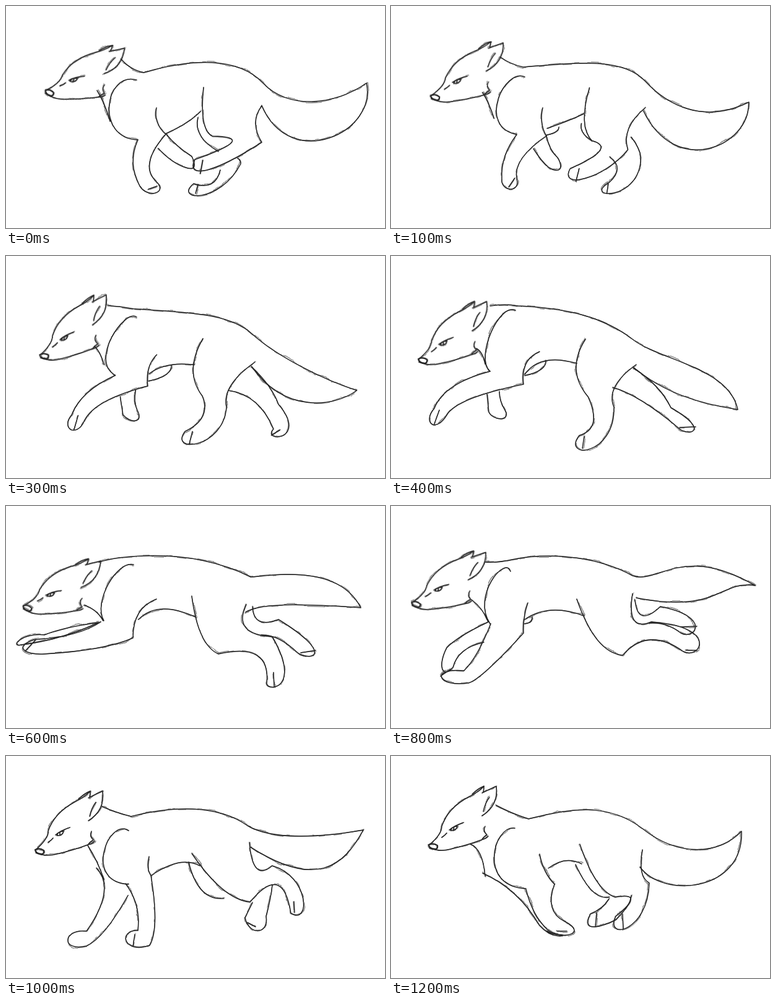
Write an HTML page without scripts that moves like this. It is 612 px wide and 360 px high and loops after 1300 ms.

```html
<!DOCTYPE html>
<html lang="en">
<head>
<meta charset="utf-8">
<title>Running fox sketch</title>
<style>
html, body { margin: 0; width: 100%; height: 100%; overflow: hidden; background: #fff; }
svg { display: block; width: 612px; height: 360px; }
path { fill: none; stroke: #222; stroke-width: 1.5; stroke-linecap: round; stroke-linejoin: round; }
.bold { stroke-width: 2; }

/* seven key poses; each holds for one step, then shows the halfway pose */
.pose { animation: 1.3s steps(2) infinite; }

/* the head is rigid: nose position and tilt */
.head { animation-name: head; }
@keyframes head {
  0% { transform: translate(70px, 141px) rotate(13deg); }
  15.38% { transform: translate(72px, 156px) rotate(-3deg); }
  30.76% { transform: translate(51px, 170px) rotate(1deg); }
  46.15% { transform: translate(34px, 166px) rotate(11deg); }
  61.53% { transform: translate(40px, 160px) rotate(7deg); }
  76.92% { transform: translate(54px, 155px) rotate(0deg); }
  92.3%, 100% { transform: translate(68px, 147px) rotate(0deg); }
}

/* neck, withers, tail root, tail tip, back to the rump */
.back { animation-name: back; }
@keyframes back {
  0% { d: path("M186 86Q200 103 222 108C300 85 375 82 415 125C455 168 530 162 582 125C600 205 460 270 413 162"); }
  15.38% { d: path("M168 80Q185 86 205 90C290 100 372 82 405 118C438 154 480 222 573 187C560 250 460 290 402 178"); }
  30.76% { d: path("M160 81Q185 77 205 81C285 84 345 100 390 135C435 170 545 180 560 249C500 240 440 222 391 180"); }
  46.15% { d: path("M150 91Q180 82 222 81C290 78 350 92 395 115C420 115 535 90 573 165C500 160 415 155 387 172"); }
  61.53% { d: path("M152 91Q175 92 195 87C265 73 340 85 390 113C430 128 470 60 588 129C530 120 530 175 396 149"); }
  76.92% { d: path("M155 82Q178 92 202 98C265 82 340 77 390 113C430 137 510 132 577 120C545 180 500 215 395 148"); }
  92.3%, 100% { d: path("M170 80Q194 93 222 102C290 85 350 75 405 117C465 165 530 160 566 122C570 220 440 232 402 180"); }
}

/* throat, then shoulder */
.chest { animation-name: chest; }
@keyframes chest {
  0% { d: path("M147 137Q160 158 168 187M211 120C160 105 143 215 213 217"); }
  15.38% { d: path("M148 143Q157 155 165 178M221 110C208 95 133 175 193 200"); }
  30.76% { d: path("M138 150Q148 155 152 175M201 88C175 75 135 165 160 187"); }
  46.15% { d: path("M127 161Q147 168 157 186M206 95C180 88 140 155 158 186"); }
  61.53% { d: path("M130 152Q148 165 157 188M193 106C185 80 130 145 160 191"); }
  76.92% { d: path("M132 145Q148 170 158 200M198 121C165 100 125 205 198 208"); }
  92.3%, 100% { d: path("M128 143Q148 150 152 195M200 117C165 112 140 212 218 215"); }
}

/* belly, then the far upper arm where it shows */
.belly { animation-name: belly; }
@keyframes belly {
  0% { d: path("M258 207Q296 190 314 171M258 207Q258 207 258 207"); }
  15.38% { d: path("M246 190Q275 184 308 179M244 212Q284 203 284 186"); }
  30.76% { d: path("M216 192Q240 157 300 174M216 194Q252 186 250 169"); }
  46.15% { d: path("M214 184Q245 152 306 180M214 184Q214 184 214 184"); }
  61.53% { d: path("M216 184Q255 157 311 178M216 191Q228 190 228 180"); }
  76.92% { d: path("M234 194Q282 161 313 178M234 194Q234 194 234 194"); }
  92.3%, 100% { d: path("M254 182Q282 161 308 175M264 208Q264 208 264 208"); }
}

/* legs: front edge, curve round the paw, back edge, toe line */
.near-fore { animation-name: near-fore; }
@keyframes near-fore {
  0% { d: path("M213 217Q196 255 216 292C228 312 262 304 243 285Q214 258 258 208Q238 190 243 165M230 297L244 292"); }
  15.38% { d: path("M193 200Q158 230 142 268C125 292 158 302 163 276Q180 236 244 214Q240 190 247 165M150 290L155 267"); }
  30.76% { d: path("M160 187Q85 207 70 247C50 270 72 288 90 258Q106 230 214 208Q209 168 240 155M70 272L78 250"); }
  46.15% { d: path("M153 188Q118 212 45 217C12 228 30 242 62 240Q160 234 205 214Q205 165 243 151M32 234L48 217"); }
  61.53% { d: path("M161 191Q140 245 118 267C62 262 75 295 125 287Q145 282 214 206Q213 180 221 157M80 276L96 265"); }
  76.92% { d: path("M193 207Q218 240 213 283C180 282 190 322 232 307Q248 280 234 194Q226 182 231 163M205 309L208 289"); }
  92.3%, 100% { d: path("M218 216Q228 258 252 281C275 300 320 288 280 268Q248 252 264 208Q246 190 240 159M268 284L284 284"); }
}
.far-fore { animation-name: far-fore; }
@keyframes far-fore {
  0% { d: path("M246 231Q268 255 290 262C308 268 306 256 300 244Q275 228 258 207"); }
  15.38% { d: path("M214 232Q217 248 220 262C235 275 252 275 240 250Q236 240 244 214"); }
  30.76% { d: path("M155 224Q157 245 158 253C165 268 195 268 184 250Q175 235 175 220"); }
  46.15% { d: path("M150 189Q95 196 62 209C25 205 5 230 25 225Q85 218 148 190"); }
  61.53% { d: path("M157 188Q105 213 90 230C74 262 84 280 100 262Q108 230 150 221"); }
  76.92% { d: path("M146 182Q178 215 130 284C92 280 88 318 130 308Q158 296 197 226"); }
  92.3%, 100% { d: path("M148 190Q205 215 240 275C262 300 285 290 275 290Q262 290 252 284"); }
}
.near-hind { animation-name: near-hind; }
@keyframes near-hind {
  0% { d: path("M319 132Q312 200 333 211Q410 212 305 249C290 285 345 265 413 221Q393 188 413 162M314 272L318 250"); }
  15.38% { d: path("M322 133Q292 190 316 226Q322 248 274 278C250 310 340 300 352 245Q350 208 408 168M283 297L290 277"); }
  30.76% { d: path("M314 135Q282 185 318 228Q342 280 304 291C275 330 362 325 360 245Q346 212 396 176M309 312L312 292"); }
  46.15% { d: path("M300 146Q310 225 343 240Q428 220 421 288C424 302 478 295 430 212Q365 208 388 160M433 294L432 270"); }
  61.53% { d: path("M300 151Q330 238 374 242Q415 195 472 236C500 250 530 195 420 188Q380 205 390 142M476 234L494 234"); }
  76.92% { d: path("M300 158Q350 232 394 237Q447 172 460 255C492 275 490 195 430 178Q398 205 393 140M466 254L465 236"); }
  92.3%, 100% { d: path("M305 143Q330 218 362 229Q412 220 363 260C345 300 415 285 417 206Q398 195 406 152M375 281L374 256"); }
}
/* starts with the far thigh, which folds away when hidden */
.far-hind { animation-name: far-hind; }
@keyframes far-hind {
  0% { d: path("M310 181Q302 212 343 236M346 266Q338 300 303 288C270 315 345 322 379 256Q380 250 374 247M306 304L310 289"); }
  15.38% { d: path("M305 200Q305 200 305 200M360 223Q418 225 402 284C345 310 460 315 428 235Q424 212 402 178M391 303L392 288"); }
  30.76% { d: path("M299 180Q299 180 299 180M358 213Q400 225 462 277C478 295 520 285 452 246Q435 210 392 182M466 278L492 277"); }
  46.15% { d: path("M308 181Q308 181 308 181M412 209Q440 208 472 239C495 252 530 240 440 184Q400 200 398 163M476 238L500 234"); }
  61.53% { d: path("M312 178Q312 178 312 178M417 190Q445 188 468 206C490 218 520 180 435 163Q398 198 394 152M468 196L494 195"); }
  76.92% { d: path("M295 172Q310 235 352 231M398 238Q392 250 386 262C392 292 425 290 420 260Q428 230 430 209M390 270L403 277"); }
  92.3%, 100% { d: path("M298 176Q325 235 352 229M352 232Q342 248 322 256C305 290 345 275 364 265Q388 240 388 226M330 276L332 254"); }
}
</style>
</head>
<body>
<svg viewBox="0 0 612 360">
  <!-- a faint wobbly second line gives the pencil look -->
  <filter id="pencil" filterUnits="userSpaceOnUse" x="0" y="0" width="612" height="360" color-interpolation-filters="sRGB">
    <feTurbulence type="fractalNoise" baseFrequency=".04" numOctaves="2" seed="4"/>
    <feDisplacementMap in="SourceGraphic" scale="8" xChannelSelector="R" yChannelSelector="G"/>
    <feComponentTransfer result="ghost"><feFuncA type="linear" slope=".55"/></feComponentTransfer>
    <feMerge><feMergeNode in="ghost"/><feMergeNode in="SourceGraphic"/></feMerge>
  </filter>
  <g filter="url(#pencil)">
    <path class="pose back"/>
    <path class="pose chest"/>
    <path class="pose belly"/>
    <path class="pose far-fore"/>
    <path class="pose far-hind"/>
    <path class="pose near-fore"/>
    <path class="pose near-hind"/>
    <g class="pose head">
      <path d="M82-98Q71-87 58-81 24-63 14-33 14-20-6-3"/>
      <path d="M63-85Q73-95 82-98 82-93 81-89M79-87Q91-93 102-98 106-67 79-50M81-57Q84-71 91-80"/>
      <path d="M-6 2Q11 9 28 4 54-2 78-11 86-13 89-17M84-33Q80-25 87-19 82-16 79-12"/>
      <path d="M26-27Q34-34 49-39M28-26Q30-33 39-33 37-25 28-26M33-32V-27M14-15Q19-18 22-22"/>
      <path class="bold" d="M-7-3Q0-7 7-2 8 3 4 4-7 3-7-3"/>
    </g>
  </g>
</svg>
</body>
</html>
```
